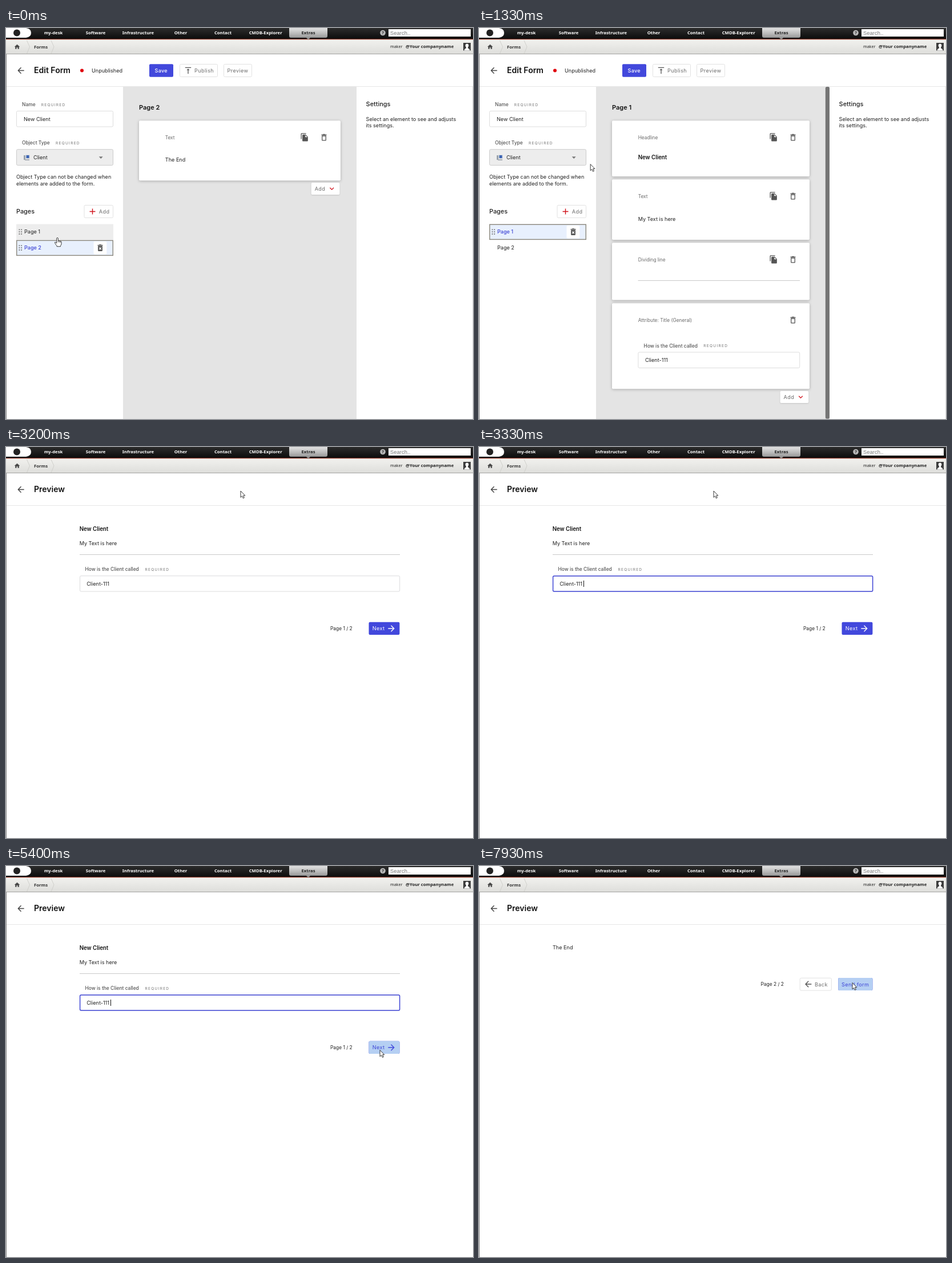
Animation, 818 px wide and 685 px high, one loop 8000 ms. Source, as an HTML page:

```html
<!DOCTYPE html>
<html lang="en">
<head>
<meta charset="utf-8">
<title>Form editor</title>
<style>
  html, body { margin: 0; width: 100%; height: 100%; overflow: hidden; background: #fff; }
  svg { display: block; width: 818px; height: 685px; }
  text { font: 400 9.1px Inter, sans-serif; fill: #222; white-space: pre; }
  .nav { font: 700 7.75px "Noto Sans", "Open Sans", sans-serif; }
  .label { font-size: 8.45px; font-weight: 500; fill: #555; }
  .req { font-size: 6.5px; letter-spacing: 1.3px; fill: #777; }
  .kind { font-size: 8.32px; fill: #6a6a6a; }
  .btn { letter-spacing: .4px; fill: #6d6d6d; }
  .white { fill: #fff; }
  .blue { fill: #3f46d6; }
  .h1 { font-size: 14px; font-weight: 600; fill: #111; }
  .h2 { font-size: 11px; font-weight: 600; fill: #111; }
  .h3 { font-size: 10.9px; font-weight: 500; }
  .head { font-size: 9.65px; font-weight: 600; fill: #111; }
  .count { font-size: 8.4px; }
  .card { fill: #fff; filter: drop-shadow(0 1px 2.5px rgba(0,0,0,.26)); }
  .lift { filter: drop-shadow(0 1px 1px rgba(0,0,0,.14)); }
</style>
</head>
<body>
<svg id="stage" viewBox="0 0 818 685" xmlns="http://www.w3.org/2000/svg"></svg>
<script>
const BLUE = '#4248dc', PALE = '#b5cff3', GREY = '#555', RED = '#d0121b';

const ICONS = {
  back: 'M20 11H7.83l5.59-5.59L12 4l-8 8 8 8 1.41-1.41L7.83 13H20v-2z',
  next: 'M4 11h12.17l-5.59-5.59L12 4l8 8-8 8-1.41-1.41L16.17 13H4z',
  publish: 'M8 11h3v10h2V11h3l-4-4-4 4zM4 3v2h16V3H4z',
  add: 'M19 13h-6v6h-2v-6H5v-2h6V5h2v6h6v2z',
  down: 'M16.59 8.59L12 13.17 7.41 8.59 6 10l6 6 6-6z',
  home: 'M10 20v-6h4v6h5v-8h3L12 3 2 12h3v8z',
  copy: 'M16 1H4c-1.1 0-2 .9-2 2v14h2V3h12V1zm-1 4l6 6v10c0 1.1-.9 2-2 2H8c-1.1 0-2-.9-2-2V7c0-1.1.9-2 2-2h7zm-1 7h5.5L14 6.5V12z',
  bin: 'M6 19c0 1.1.9 2 2 2h8c1.1 0 2-.9 2-2V7H6v12zM8 9h8v10H8V9zm7.5-5l-1-1h-5l-1 1H5v2h14V4h-3.5z',
  erase: 'M6 19c0 1.1.9 2 2 2h8c1.1 0 2-.9 2-2V7H6v12zm2.46-7.12l1.41-1.41L12 12.59l2.12-2.12 1.41 1.41L13.41 14l2.12 2.12-1.41 1.41L12 15.41l-2.12 2.12-1.41-1.41L10.59 14l-2.13-2.12zM15.5 4l-1-1h-5l-1 1H5v2h14V4z'
};

// Markup helpers; boxes are given by their edges
const text = (x, y, s, cls = '', more = '') => `<text x="${x}" y="${y}" class="${cls}" ${more}>${s}</text>`;
const box = (x, y, x2, y2, fill, more = '') =>
  `<rect x="${x}" y="${y}" width="${x2 - x}" height="${y2 - y}" fill="${fill}" ${more}/>`;
const icon = (name, cx, cy, fill = GREY, size = 15.6) =>
  `<path d="${ICONS[name]}" fill="${fill}" transform="translate(${cx - size / 2} ${cy - size / 2}) scale(${size / 24})"/>`;
const group = (id, s) => `<g id="${id}">${s}</g>`;
const outline = (c, w = 1, r = 2) => `stroke="${c}" stroke-width="${w}" rx="${r}"`;
const button = (x, y, x2, y2, more = '') => box(x, y, x2, y2, '#fff', outline('#e2e2e2') + more);

function header() {
  const items = [['my-desk', 83], ['Software', 157], ['Infrastructure', 231.5], ['Other', 306],
    ['Contact', 380], ['CMDB-Explorer', 454.7]];
  const crumb = x => `<path d="M${x} 22l5 11-5 12" fill="none" stroke="#d0d0cc"/>`;
  return box(0, 0, 818, 19, 'url(#dark)') +
    box(0, 19, 818, 20, '#8e3a2a') + box(0, 20, 818, 21, '#d9c3bc') +
    box(0, 21, 818, 45, 'url(#bar)') + box(0, 45, 818, 46, '#a3a3a0') +
    '<path d="M0 0H35Q44 1 44 8.500T35 17H0z" fill="#fff"/><circle cx="19" cy="8.500" r="6" fill="#222"/>' +
    items.map(([s, x]) => text(x, 10.7, s, 'nav white', 'text-anchor="middle"')).join('') +
    '<path d="M496 0H563V14Q563 17 560 17H533L529.500 20.500 526 17H499Q496 17 496 14z" fill="url(#tab)"/>' +
    text(529.5, 11, 'Extras', 'nav', 'text-anchor="middle"') +
    '<circle cx="660" cy="8.500" r="4.800" fill="#b9b9b9"/>' +
    text(660, 11.2, '?', 'nav', 'text-anchor="middle"') +
    box(670, 2, 814, 15, '#fff') +
    text(673, 12, 'Search..', '', 'style="font:9.3px Liberation Sans,sans-serif;fill:#777;letter-spacing:.1px"') +
    icon('home', 19.5, 33, '#4a4a4a', 11.5) + crumb(36.5) + crumb(79) +
    text(49, 35.7, 'Forms', 'nav', 'style="fill:#333"') +
    text(673, 35.3, 'maker', 'nav', 'style="font-weight:400;font-size:7.1px"') +
    text(700, 35.3, '@Your companyname', 'nav') +
    box(801, 26, 814, 39.5, '#3d3d3d') +
    '<path d="M802.500 39.500Q803 36 806 35.500V34Q804.500 32 804.600 30 805 27.500 807.500 27.500T810.400 30Q810.500 32 809 34V35.500Q812 36 812.500 39.500z" fill="#fff"/>' +
    box(0, 46, 1, 685, '#858585') + box(1, 102, 818, 103, '#e6e6e6') + icon('back', 26, 74.5, '#444', 17);
}

function row(n, y) {
  let dots = '';
  for (let i = 0; i < 6; i++)
    dots += `<circle cx="${23.4 + i % 2 * 3.7}" cy="${y + 9.7 + (i >> 1) * 3.8}" r="1.050" fill="#777"/>`;
  const label = (cls, w) => text(32, y + 16.8, 'Page ' + n, cls, `style="font-weight:${w}"`);
  return (n === 1 ? box(18, y, 188, y + 27.5, '#ededed') : '') +
    group('sel' + n, box(18, y, 188, y + 27.5, '#e8f0fd')) +
    group('focus' + n, box(18.7, y + .7, 187.3, y + 26.8, 'none', outline('#8b877c', 1.4, 0))) +
    group('dots' + n, dots) +
    group('bin' + n, group('pad' + n, box(153.5, y + 2.3, 176.3, y + 25, '#fff', 'rx="2"')) + icon('erase', 165, y + 13.5)) +
    group('plain' + n, label('', 400)) + group('strong' + n, label('', 500)) + group('lit' + n, label('blue', 500));
}

function card(y, y2, right, kind, copy, body) {
  return box(233, y, right, y2, '#fff', 'class="card" rx="2"') + text(278.7, y + 32.2, kind, 'kind') +
    (copy ? icon('copy', right - 63, y + 29) : '') + icon('bin', right - 29, y + 29.3) + body;
}

const addBox = (x, y) => box(x, y, x + 49.7, y + 21, '#fff', 'class="lift" rx="2"') +
  text(x + 6, y + 13.7, 'Add', 'btn') + icon('down', x + 36, y + 10.5, RED, 15);

function editor() {
  return text(49, 79.3, 'Edit Form', 'h1') + '<circle cx="133" cy="74.500" r="3" fill="#e0000c"/>' +
    text(150, 77.8, 'Unpublished') +
    box(251, 63.3, 293, 85.7, BLUE, 'rx="2"') +
    text(260.5, 77.8, 'Save', 'btn white', 'style="font-weight:500;letter-spacing:.3px"') +
    button(304.5, 63.5, 370.5, 85.5) + group('pubHover', box(304.5, 63.5, 370.5, 85.5, '#ebebeb', outline('#d9d9d9'))) +
    icon('publish', 319, 74.5) + text(330, 77.8, 'Publish', 'btn') +
    button(381.5, 63.5, 430.5, 85.5) + group('preHover', box(381.5, 63.5, 430.5, 85.5, '#ebebeb', outline('#d9d9d9'))) +
    text(387.5, 77.8, 'Preview', 'btn') +
    text(28, 137, 'Name', 'label') + text(61.7, 136.6, 'REQUIRED', 'req') +
    box(18.5, 145.5, 187.5, 173, '#fff', outline('#ddd')) + text(31, 162.8, 'New Client') +
    text(28, 204.4, 'Object Type', 'label') + text(87, 204, 'REQUIRED', 'req') +
    box(18.5, 212.7, 187.5, 240.5, '#ededed', outline('#cbcbcb')) +
    box(31, 223, 34, 231, '#9aa3ad') + box(34.5, 222, 41.5, 229, '#cfd6de') + box(35.5, 223, 40.5, 228, '#3c64b4') +
    box(33, 230, 41, 232, '#a9aeb5') +
    text(48, 230.2, 'Client') + '<path d="M162.700 225.200h7l-3.500 3.700z" fill="#777"/>' +
    text(18, 264, 'Object Type can not be changed when') + text(18, 276, 'elements are added to the form.') +
    text(18, 324.5, 'Pages', 'h3') + button(137, 310.5, 187.5, 332.5) + icon('add', 151.5, 321.5, RED, 17) +
    text(162.8, 324.8, 'Add', 'btn') + row(1, 343.6) + row(2, 371.6) +
    box(205, 103, 614, 685, '#e4e4e4') + box(817, 103, 818, 685, '#e2e2e2') +
    text(630.6, 137, 'Settings', 'h3') +
    text(630.6, 163, 'Select an element to see and adjusts') + text(630.6, 174, 'its settings.') +
    group('edit2', text(233, 142.7, 'Page 2', 'h2') +
      card(162.3, 267.3, 586, 'Text', true, text(278.8, 234.3, 'The End')) + addBox(534.7, 271)) +
    group('edit1', text(233, 142.7, 'Page 1', 'h2') +
      card(162.3, 260, 579, 'Headline', true, text(278.7, 229.6, 'New Client', 'head')) +
      card(265.3, 371, 579, 'Text', true, text(278.7, 338, 'My Text is here')) +
      card(376.3, 476.5, 579, 'Dividing line', true, box(278.5, 442, 562, 443, '#c8c8c8')) +
      card(482.3, 632.3, 579, 'Attribute: Title (General)', false,
        text(288.6, 559.5, 'How is the Client called', 'label') + text(393.3, 559, 'REQUIRED', 'req') +
        box(278.9, 568, 561.7, 595.5, '#fff', outline('#ddd')) + text(291, 585.3, 'Client-111')) +
      addBox(527.5, 636) + box(606.8, 103, 614, 684.5, '#757575', 'rx="2.5"'));
}

function preview() {
  const nextLabel = (c, cls) => text(641.7, 321.3, 'Next', 'btn ' + cls) + icon('next', 675, 318, c, 17);
  const nextBox = c => box(635.5, 306.8, 689.4, 328.9, c, 'rx="2"');
  const sendBox = c => box(629.3, 196, 689.4, 218, c, 'rx="2"');
  return text(49, 79.3, 'Preview', 'h1') +
    group('view1', text(128.7, 146.7, 'New Client', 'head') + text(128.7, 172, 'My Text is here') +
      box(129, 188, 690, 189, '#c9c9c9') +
      text(138.5, 217, 'How is the Client called', 'label') + text(243.5, 216.7, 'REQUIRED', 'req') +
      box(129.5, 225.8, 689.7, 253, '#fff', outline('#ddd')) +
      group('inFocus', box(129.6, 225.9, 689.6, 252.9, 'none', outline('#3f46d6', 1.5))) +
      text(141.2, 243, 'Client-111') + group('caret', box(183, 234, 184, 245, '#111')) +
      text(568, 321, 'Page 1 / 2', 'count') + nextBox(BLUE) + nextLabel('#fff', 'white') +
      group('nextHover', nextBox(PALE) + nextLabel(BLUE, 'blue'))) +
    group('view2', text(129, 146, 'The End') + text(493.5, 210, 'Page 2 / 2', 'count') +
      button(562.2, 196.3, 617.3, 218) + icon('back', 576.7, 207, GREY, 17) + text(588, 210.6, 'Back', 'btn') +
      sendBox(BLUE) + text(635, 210.6, 'Send form', 'btn white') +
      group('sendHover', sendBox(PALE) + text(635, 210.6, 'Send form', 'btn blue')));
}

const gradient = (id, ...stops) => `<linearGradient id="${id}" x2="0" y2="1">` +
  stops.map((c, i) => `<stop offset="${i / (stops.length - 1)}" stop-color="${c}"/>`).join('') + '</linearGradient>';

const stage = document.getElementById('stage');
stage.innerHTML = '<defs>' + gradient('dark', '#2c2c2c', '#1c1c1c', '#0c0c0c') +
  gradient('bar', '#f1f1ee', '#dededb') + gradient('tab', '#e2e2e2', '#b8b8b8', '#858585') + '</defs>' +
  box(0, 0, 818, 685, '#fff') + group('editor', editor()) + group('preview', preview()) + header() +
  group('pointer', group('arrow', '<path d="M0 .500V11.800L2.600 9.400 4.300 13.300 6.300 12.500 4.600 8.600H7.800z" fill="#fff" stroke="#222" stroke-width=".9"/>') +
    group('hand', '<path d="M-1.300 1.200Q0 -.700 1.300 1.200V5.800Q2.400 5 3.300 6.200 4.500 5.500 5.200 6.700 7 6.300 7 8.200V11Q7 13 5.500 14.500V15.800H-1V14.500Q-3 12.500 -4.500 9.300 -4.800 7.700 -3 8.300L-1.300 10.200z" fill="#fff" stroke="#222" stroke-width=".9" stroke-linejoin="round"/><path d="M1.300 5.800v2.600M3.300 6.200v2.500M5.200 6.700v2.300" stroke="#222" stroke-width=".7"/>'));

const parts = {};
stage.querySelectorAll('g[id]').forEach(g => parts[g.id] = g);
const show = (id, k) => parts[id].setAttribute('opacity', +k);

const ease = {
  hold: u => u < 1 ? 0 : 1,
  line: u => u,
  in: u => u ** 1.5,
  out: u => 1 - (1 - u) ** 2,
  both: u => u * u * (3 - 2 * u)
};
// Pointer tip: time, x, y, easing towards this point
const path = [
  [0, 90, 367], [70, 90, 367, 'hold'], [330, 87, 363, 'both'], [930, 87, 363, 'hold'],
  [1800, 332, 80, 'both'], [2070, 397.5, 77, 'line'], [2330, 410, 77, 'out'],
  [2670, 411, 76.5, 'hold'], [3660, 411, 76.5, 'hold'], [4530, 471, 324, 'in'],
  [4930, 654, 323, 'out'], [5070, 655, 322, 'hold'], [7260, 655, 322, 'hold'],
  [7930, 654, 204, 'both'], [8000, 654, 204, 'hold']
];

function tip(t) {
  const i = path.findIndex(p => p[0] > t);
  const [t0, x0, y0] = path[i - 1], [t1, x1, y1, e] = path[i];
  const k = ease[e]((t - t0) / (t1 - t0));
  return [x0 + (x1 - x0) * k, y0 + (y1 - y0) * k];
}

const fade = (t, a, b) => Math.min(1, Math.max(0, (t - a) / (b - a)));

function draw(t) {
  const switched = t >= 530, inPreview = t >= 3200, second = t >= 6330;
  const lit = fade(t, 650, 870);

  show('sel1', lit); show('sel2', !switched);
  show('focus1', switched); show('focus2', !switched);
  show('dots2', !switched);
  show('bin1', fade(t, 70, 270)); show('bin2', 1 - fade(t, 660, 870));
  show('pad2', !switched);
  show('plain1', !switched); show('strong1', switched ? 1 - lit : 0); show('lit1', lit);
  show('plain2', switched); show('strong2', 0); show('lit2', !switched);
  show('edit1', switched); show('edit2', !switched);
  show('pubHover', fade(t, 1750, 1930) - fade(t, 2100, 2270));
  show('preHover', fade(t, 2100, 2300));

  show('editor', !inPreview); show('preview', inPreview);
  show('view1', !second); show('view2', second);
  show('inFocus', fade(t, 3200, 3320) - fade(t, 5850, 6050));
  show('caret', t > 3260 && t < 5870 && (t - 3260) % 1066 < 533);
  show('nextHover', fade(t, 4740, 4930));
  show('sendHover', fade(t, 7720, 7900));

  const [x, y] = tip(t), onRow = y > 344 && x < 188;
  parts.pointer.setAttribute('transform', `translate(${x} ${y})`);
  show('hand', onRow); show('arrow', !onRow);
}

const start = performance.now();
function tick() {
  draw((performance.now() - start) % 8000);
  requestAnimationFrame(tick);
}
tick();
</script>
</body>
</html>
```
